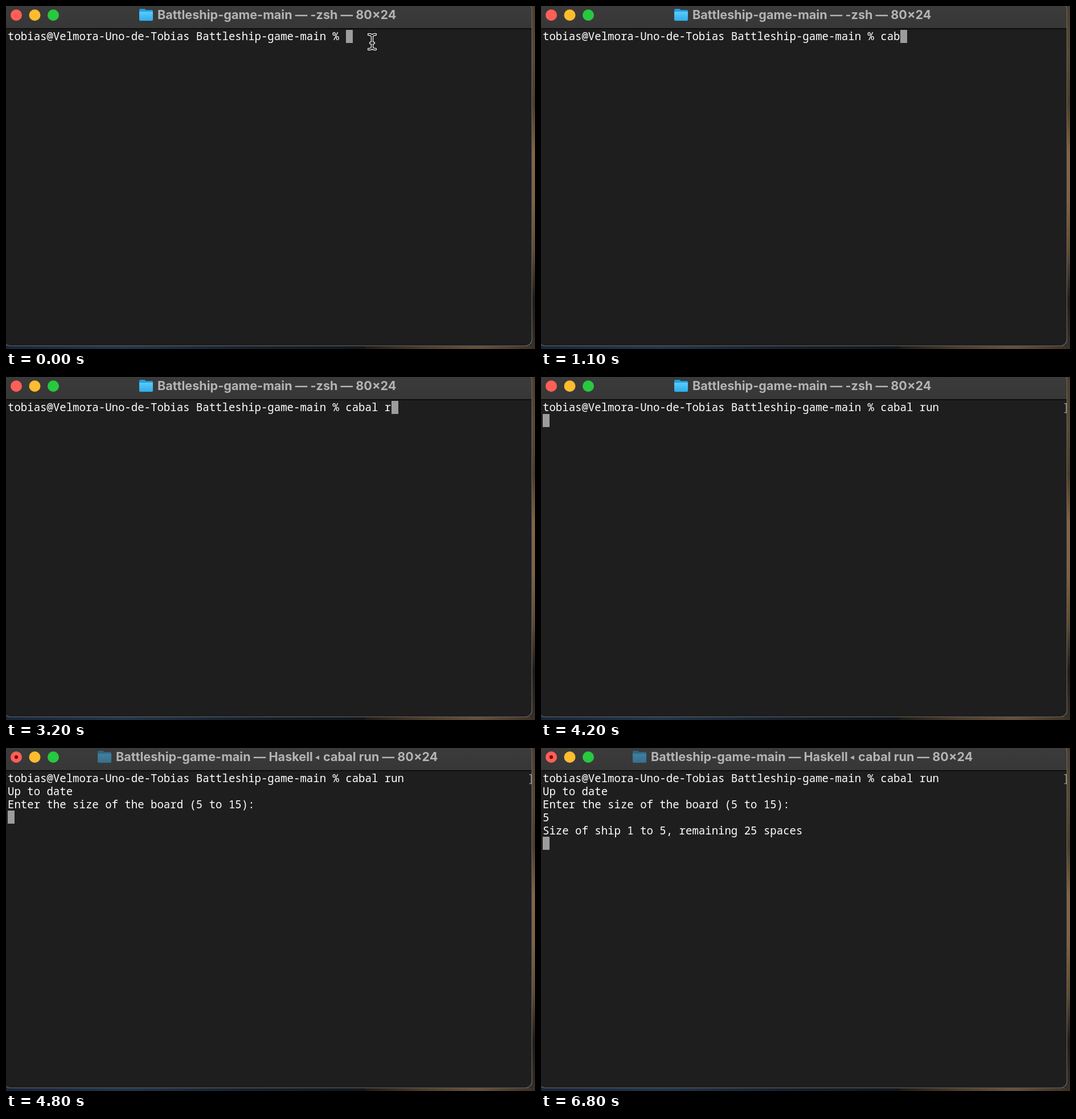
An HTML page with a canvas that plays this animation: 929 px wide and 603 px high, repeating every 8 s.

```html
<!DOCTYPE html>
<html lang="en">
<head>
<meta charset="utf-8">
<title>Terminal</title>
<style>
  html, body { margin: 0; width: 100%; height: 100%; overflow: hidden; background: #1e1e1e; }
  canvas { display: block; width: 929px; height: 603px; }
</style>
</head>
<body>
<canvas id="stage" width="929" height="603"></canvas>
<script>
const ctx = document.getElementById('stage').getContext('2d');
const W = 929, H = 603, LOOP = 8000;
const COL = 11.42, ROW = 22.8, LEFT = 3, TOP = 42;
const MONO = '500 19.03px "Noto Sans Mono", "DejaVu Sans Mono", monospace';
const BOLD = '700 21.6px Inter, "Liberation Sans", sans-serif';
const PROMPT = 'tobias@Velmora-Uno-de-Tobias Battleship-game-main % ';
const COMMAND = 'cabal run';
const KEYS = [700, 900, 1100, 1300, 1500, 3000, 3200, 3400, 3500];
const ENTER = 4200, RUNNING = 4300, ANSWER = 6400, REPLY = 6600;

function rect(x, y, w, h, fill) {
  ctx.fillStyle = fill;
  ctx.fillRect(x, y, w, h);
}

function disc(x, y, r, fill) {
  ctx.fillStyle = fill;
  ctx.beginPath();
  ctx.arc(x, y, r, 0, Math.PI * 2);
  ctx.fill();
}

function rounded(x, y, w, h, r) {
  ctx.beginPath();
  ctx.roundRect(x, y, w, h, r);
}

function gradient(x0, y0, x1, y1, ...colors) {
  const g = ctx.createLinearGradient(x0, y0, x1, y1);
  colors.forEach((c, i) => g.addColorStop(i / (colors.length - 1), c));
  return g;
}

function drawDesktop() {
  rect(0, 0, W, H, '#1b2028');
  rect(0, 597, 630, 6, gradient(0, 0, 630, 0, '#18273a', '#21354a', '#17212c', '#12171d'));
  rect(630, 597, 299, 6, gradient(630, 0, 929, 0, '#211c17', '#4a3b2a', '#655039', '#3c3025'));
  rect(922, 0, 7, H, gradient(0, 0, 0, H,
    '#4d3c2b', '#5c4730', '#4e3b28', '#846442', '#806140', '#624b33', '#201c19', '#3a3026'));
}

function drawWindow() {
  ctx.save();
  rounded(-4, -5, 927.5, 602.5, 11);
  ctx.clip();
  rect(0, 0, W, H, '#1e1e1e');
  rect(0, 0, W, 39, gradient(0, 0, 0, 39, '#3b3b3b', '#373737'));
  rect(0, 39, W, 1.5, '#070707');
  ctx.restore();
  rounded(-4, -5, 927.5, 602.5, 11);
  ctx.strokeStyle = '#666';
  ctx.lineWidth = 1.2;
  ctx.stroke();
}

function drawLights(running) {
  ['#ff5f57', '#febc2e', '#28c840'].forEach((c, i) => disc(18 + i * 32.5, 16, 10, c));
  if (running) disc(18, 16, 3.2, '#7e0d08');
}

function drawFolder(x, dim) {
  const [tab, light, dark] = dim
    ? ['#2f6784', '#427f9d', '#35708f']
    : ['#22a1e0', '#5bcbfa', '#2dabeb'];
  ctx.fillStyle = tab;
  rounded(x, 5, 11, 8, 2);
  ctx.fill();
  rounded(x, 7, 24, 18, 2);
  ctx.fill();
  ctx.fillStyle = gradient(0, 10, 0, 26, light, dark);
  rounded(x, 10, 24, 16, [1, 1, 2, 2]);
  ctx.fill();
}

function drawTitle(running) {
  const x = running ? 193 : 266;
  drawFolder(x - 32, running);
  ctx.font = BOLD;
  ctx.fillStyle = '#b4b4b4';
  if (!running) {
    ctx.fillText('Battleship-game-main — -zsh — 80×24', x, 23);
    return;
  }
  ctx.fillText('Battleship-game-main — Haskell', x, 23);
  ctx.fillText('cabal run — 80×24', 557, 23);
  ctx.beginPath();
  ctx.moveTo(543, 17);
  ctx.lineTo(550, 13.2);
  ctx.lineTo(550, 20.8);
  ctx.fill();
}

function print(text, row, col = 0, fill = '#fff') {
  ctx.font = MONO;
  ctx.fillStyle = fill;
  ctx.fillText(text, LEFT + col * COL, TOP + 18.4 + row * ROW);
}

function drawCursor(row, col) {
  rect(Math.round(LEFT + col * COL), Math.round(TOP + row * ROW), 12, 23, '#9c9c9c');
}

function drawPointer(x, y) {
  ctx.lineCap = 'round';
  ctx.lineJoin = 'round';
  for (const [width, color] of [[4.4, '#fff'], [1.8, '#111']]) {
    ctx.strokeStyle = color;
    ctx.lineWidth = width;
    ctx.beginPath();
    for (const s of [-1, 1]) {
      ctx.moveTo(x - 6, y + s * 13);
      ctx.quadraticCurveTo(x, y + s * 13, x, y + s * 9);
      ctx.quadraticCurveTo(x, y + s * 13, x + 6, y + s * 13);
    }
    ctx.moveTo(x, y - 9);
    ctx.lineTo(x, y + 9);
    ctx.moveTo(x - 3, y + 2);
    ctx.lineTo(x + 3, y + 2);
    ctx.stroke();
  }
}

function drawShell(t) {
  const typed = COMMAND.slice(0, KEYS.filter(k => t >= k).length);
  print(PROMPT + typed, 0);
  if (t < ENTER) return drawCursor(0, PROMPT.length + typed.length);

  print('[', 0, -1, '#9a9a9a');
  print(']', 0, 80, '#9a9a9a');
  if (t < RUNNING) return drawCursor(1, 0);

  print('Up to date', 1);
  print('Enter the size of the board (5 to 15):', 2);
  if (t < ANSWER) return drawCursor(3, 0);

  print('5', 3);
  if (t < REPLY) return drawCursor(3, 1);

  print('Size of ship 1 to 5, remaining 25 spaces', 4);
  drawCursor(5, 0);
}

function render(t) {
  const running = t >= RUNNING;
  drawDesktop();
  drawWindow();
  drawLights(running);
  drawTitle(running);
  drawShell(t);
  if (t < KEYS[0]) drawPointer(643, 63);
}

const start = performance.now();
function tick() {
  render((performance.now() - start) % LOOP);
  requestAnimationFrame(tick);
}
tick();
</script>
</body>
</html>
```
